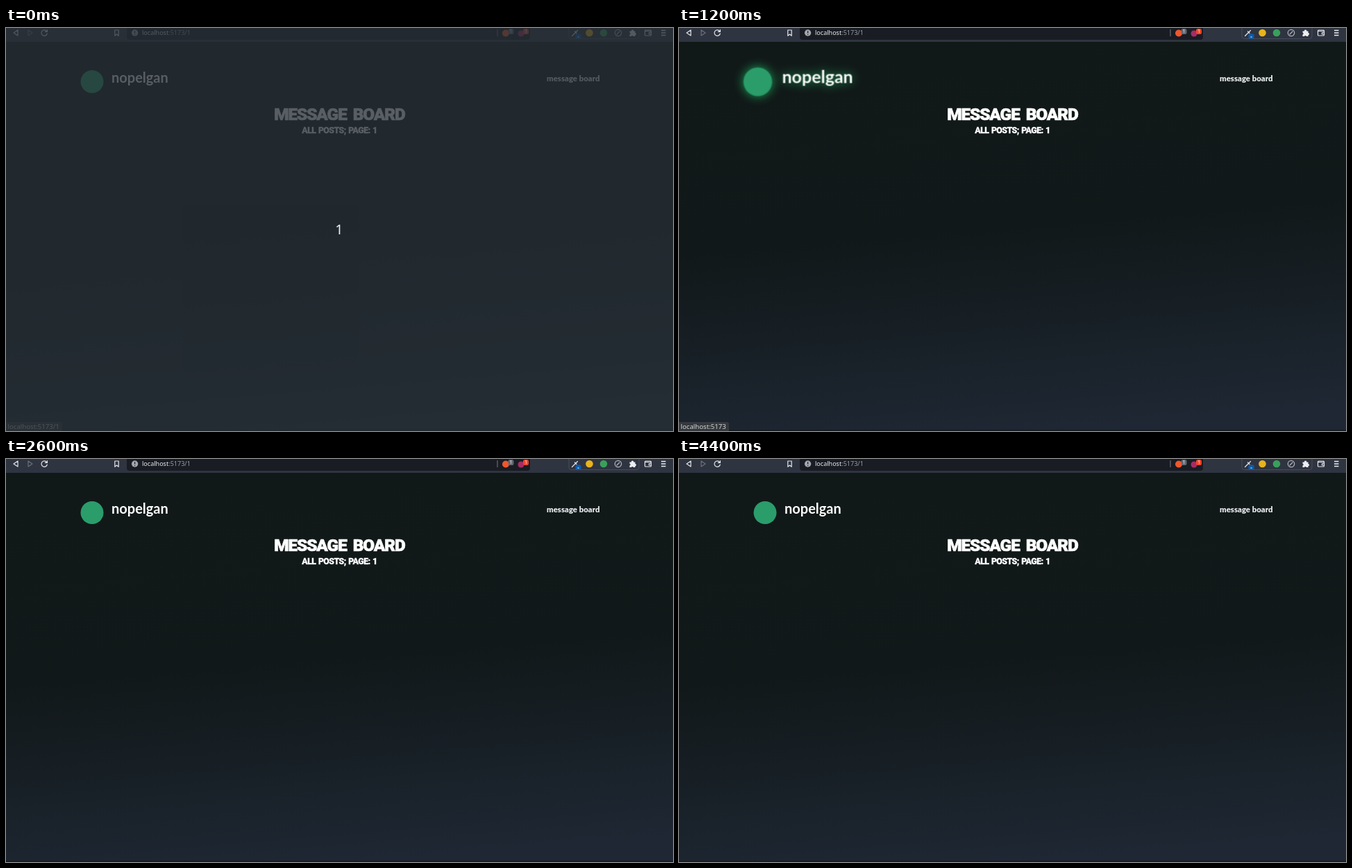
Write an HTML page that moves like this. It is 961 px wide and 582 px high and loops after 4600 ms.

```html
<!DOCTYPE html>
<html lang="en">
<head>
<meta charset="utf-8">
<title>Message board</title>
<style>
html, body { margin: 0; width: 100%; height: 100%; overflow: hidden; background: #111918; }
svg { display: block; width: 100%; height: 100%; }
.ui { font-family: "Noto Sans", "Open Sans", sans-serif; }
.brand, .link { font-family: Lato, sans-serif; }
.brand { font-size: 20px; font-weight: 700; fill: #fff; }
.link { font-size: 11.4px; font-weight: 900; fill: #e9ebee; }
.title {
  font-family: Roboto, sans-serif; font-weight: 900; text-anchor: middle;
  fill: #fff; stroke: #fff; stroke-linejoin: round;
}
.h1 { font-size: 24.4px; letter-spacing: -1.1px; word-spacing: 4px; stroke-width: .7px; }
.h2 { font-size: 12.4px; letter-spacing: -.6px; word-spacing: 1px; stroke-width: .3px; }
.line { fill: none; stroke: #e4e6ea; stroke-width: 1.2; stroke-linecap: round; stroke-linejoin: round; }
.dim { stroke: #6b707b; }
.soft { stroke: #b3b6bd; }

/* 4600 ms loop; every change is a hard 100 ms step */
.logo, .glow, .link, .long, .short, .intro, .hover {
  animation: 4.6s step-end infinite;
}
.logo { transform-origin: 166px 77px; animation-name: grow; }
.glow { animation-name: glow; }
.link { animation-name: link; }
.long { animation-name: long; }
.short { animation-name: short; }
.intro { animation-name: intro; }
.hover { animation-name: hover; }

@keyframes intro {
  0% { opacity: 1; }
  2.174%, 100% { opacity: 0; }
}
@keyframes grow {
  0% { transform: scale(1); }
  17.391% { transform: scale(1.06); }
  19.565% { transform: scale(1.19); }
  21.739% { transform: scale(1.245); }
  26.087% { transform: scale(1.25); }
  28.261% { transform: scale(1.18); }
  30.435% { transform: scale(1.05); }
  32.609% { transform: scale(1); }
  80.435% { transform: scale(1.005); }
  82.609%, 100% { transform: scale(1); }
}
@keyframes glow {
  0% { filter: none; }
  17.391% { filter: drop-shadow(0 0 2px #1fa35c55); }
  19.565% { filter: drop-shadow(0 0 4px #1fa35c99); }
  21.739% { filter: drop-shadow(0 0 6px #1fa35cdd); }
  26.087% { filter: drop-shadow(0 0 6px #1fa35c); }
  28.261% { filter: drop-shadow(0 0 4px #1fa35c99); }
  30.435% { filter: drop-shadow(0 0 2px #1fa35c55); }
  32.609%, 100% { filter: none; }
}
@keyframes link {
  0% { fill: #e9ebee; }
  54.348% { fill: #f8f9fa; }
  56.522%, 100% { fill: #e9ebee; }
}
@keyframes long {
  0% { opacity: 1; }
  17.391% { opacity: 0; }
  30.435% { opacity: 1; }
  45.652% { opacity: .66; }
  47.826% { opacity: .33; }
  50% { opacity: 0; }
  63.043% { opacity: .5; }
  65.217% { opacity: 1; }
  80.435%, 100% { opacity: 0; }
}
@keyframes short {
  0% { opacity: 0; }
  17.391% { opacity: 1; }
  30.435% { opacity: 0; }
  80.435% { opacity: 1; }
  89.13% { opacity: .75; }
  91.304% { opacity: .5; }
  93.478% { opacity: .25; }
  95.652%, 100% { opacity: 0; }
}
@keyframes hover {
  0% { opacity: 0; }
  89.13% { opacity: .08; }
  95.652%, 100% { opacity: 0; }
}
</style>
</head>
<body>
<svg viewBox="0 0 961 582" preserveAspectRatio="none">
  <defs>
    <linearGradient id="sky" gradientUnits="userSpaceOnUse" x1="457" y1="20" x2="504" y2="582">
      <stop offset="0" stop-color="#111918"/>
      <stop offset=".47" stop-color="#111819"/>
      <stop offset="1" stop-color="#1e2733"/>
    </linearGradient>
  </defs>

  <rect width="961" height="582" fill="url(#sky)"/>
  <rect y="580.5" width="961" height="1.5" fill="#15191f"/>

  <!-- toolbar -->
  <g class="ui">
    <rect width="961" height="20" fill="#2f3441"/>
    <path d="M174 0H755V13a4 4 0 0 1-4 4H178a4 4 0 0 1-4-4z" fill="#191c23"/>
    <circle class="hover" cx="55" cy="7" r="10" fill="#fff"/>
    <path class="line" d="M17 3V11L11 7z"/>
    <path class="line dim" d="M32 3V11L38 7z"/>
    <path class="line" d="M58.6 4.6A4.2 4.2 0 1 0 59.3 8M59.4 2.6V5.4H56.4"/>
    <path class="line" d="M156.8 3H162.2V11.2L159.5 9L156.8 11.2z"/>
    <circle cx="185.6" cy="7" r="4.7" fill="#a2a5ab"/>
    <path d="M185.6 4.3V7.5M185.6 9V9.9" stroke="#191c23" stroke-width="1.2"/>
    <text x="196" y="10.3" font-size="9.05" fill="#eceef0">localhost<tspan fill="#989ca4">:5173/1</tspan></text>
    <path d="M708 2V12" stroke="#777b84"/>

    <circle cx="720" cy="7.5" r="5" fill="#f1562b"/>
    <rect x="723.5" y="1" width="8" height="8" rx="2.5" fill="#646974"/>
    <text x="727.5" y="7.3" font-size="6.5" fill="#fff" text-anchor="middle">1</text>
    <circle cx="742" cy="8" r="4.5" fill="#a72b66"/>
    <rect x="745" y="1" width="8" height="8" rx="2.5" fill="#f0452d"/>
    <text x="749" y="7.3" font-size="6.5" fill="#fff" text-anchor="middle">1</text>

    <path d="M811 0V12a3.5 3.5 0 0 0 3.5 3.5H908.5a3.5 3.5 0 0 0 3.5-3.5V0" fill="none" stroke="#474c59"/>
    <path class="line" d="M815.5 11.5L820.5 6.5M819.5 5L822 7.5M821 6L823.5 3.5"/>
    <rect x="820.5" y="8.5" width="8" height="7" rx="1.5" fill="#0b5cad"/>
    <path d="M823.5 13H825.5" stroke="#fff"/>
    <circle cx="840.5" cy="7" r="5.3" fill="#e8b31c"/>
    <circle cx="861" cy="7" r="5.3" fill="#39a05b"/>
    <circle class="line soft" cx="882" cy="7" r="4.7"/>
    <path class="line soft" d="M880 9L884 5"/>
    <path d="M898.5 4.5H901a1.7 1.7 0 1 1 3.3 0H906.5V7a1.6 1.6 0 1 1 0 3.2V12H903.9a1.5 1.5 0 0 0-2.9 0H898.5V9.5a1.5 1.5 0 0 0 0-2.9z" fill="#eceef0"/>
    <rect class="line" x="920.5" y="3" width="9" height="8" rx="1"/>
    <path class="line" d="M921 4.5H929M929.5 6.5H926.5V9H929.5"/>
    <path d="M944 3.5H950.5M944 7H950.5M944 10.5H950.5" stroke="#eceef0" stroke-width="1.3"/>
  </g>

  <!-- page -->
  <g class="logo">
    <g class="glow">
      <circle cx="124" cy="77.5" r="16.5" fill="#2a9d6b"/>
      <text class="brand" x="152" y="79">nopelgan</text>
    </g>
  </g>
  <text class="link" x="779" y="77">message board</text>
  <text class="title h1" x="480.5" y="132.7">MESSAGE BOARD</text>
  <text class="title h2" x="480.5" y="151.6">ALL POSTS; PAGE: 1</text>

  <!-- link status -->
  <g class="ui" font-size="9.65" fill="#d3d5d7">
    <g class="long">
      <path d="M0 569H78a3 3 0 0 1 3 3V582H0z" fill="#35393d"/>
      <text x="2.5" y="579">localhost:5173/1</text>
    </g>
    <g class="short">
      <path d="M0 569H69a3 3 0 0 1 3 3V582H0z" fill="#35393d"/>
      <text x="2.5" y="579">localhost:5173</text>
    </g>
  </g>

  <!-- countdown veil -->
  <g class="intro ui">
    <rect width="961" height="582" fill="#262e34" fill-opacity=".77"/>
    <text x="480" y="298" font-size="20" fill="#e6f3f5" text-anchor="middle">1</text>
  </g>
</svg>
</body>
</html>
```
